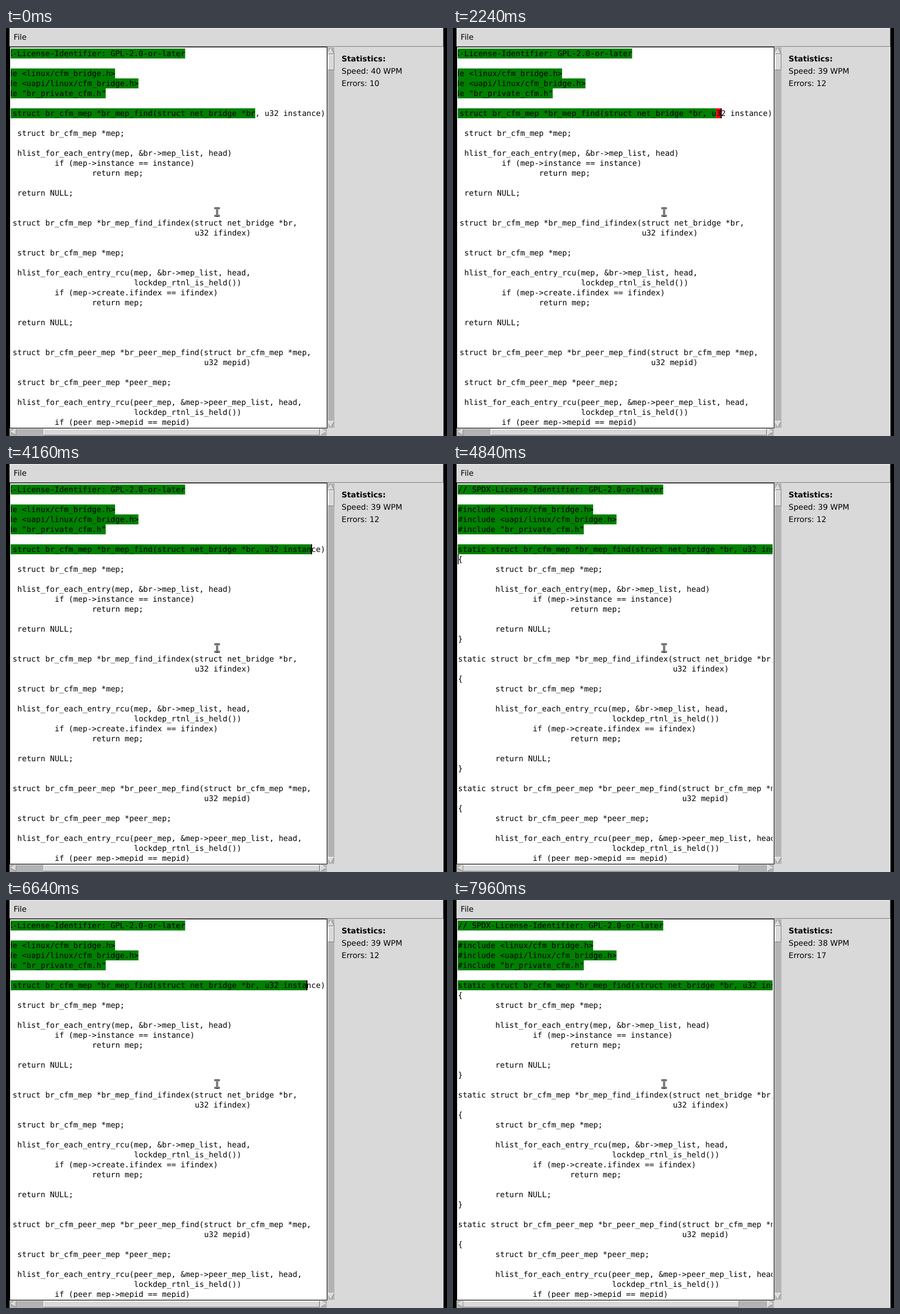
These frames come from a looping animation (752x696 px, 8 s). An HTML page:

```html
<!DOCTYPE html>
<html lang="en">
<head>
<meta charset="utf-8">
<title>Typing practice</title>
<style>
  html, body { margin: 0; width: 100%; height: 100%; overflow: hidden; background: #000; }
  svg { display: block; width: 100%; height: 100%; }
  text { font: 13.2px "DejaVu Sans", sans-serif; white-space: pre; text-rendering: geometricPrecision; }
  #code text { font: 13.23px "DejaVu Sans Mono", monospace; }
</style>
</head>
<body>
<svg viewBox="0 0 752 696">
  <defs>
    <clipPath id="view"><rect x="8" y="34" width="537" height="645"/></clipPath>
  </defs>
  <rect width="752" height="696" fill="#000"/>
  <rect x="6" width="740" height="696" fill="#d9d9d9"/>
  <path d="M6 .5H745" stroke="#eee"/>
  <path d="M6 31.5H746M745.5 0V32" stroke="#828282"/>
  <text x="13" y="20">File</text>

  <rect x="6.5" y="32.5" width="541" height="650" fill="#fff" stroke="#000"/>
  <g clip-path="url(#view)">
    <g id="scroll">
      <g id="marks"></g>
      <g id="code"></g>
      <rect id="caret" width="2" height="17"/>
    </g>
  </g>

  <g id="bars"></g>
  <g fill="none">
    <path id="beam" d="M355.5 307.5h3l1.5 1 1.5-1h3M355.5 320.5h3l1.5-1 1.5 1h3M360 308v12" stroke="#000" stroke-width="3"/>
    <path d="M356 307.5h3l1 1 1-1h3M356 320.5h3l1-1 1 1h3M360 308v12" stroke="#fff"/>
  </g>

  <text x="572.3" y="57" style="font-weight:bold">Statistics:</text>
  <text id="speed" x="572.3" y="78"></text>
  <text id="errors" x="572.3" y="99"></text>
</svg>
<script>
const NS = 'http://www.w3.org/2000/svg';
const $ = id => document.getElementById(id);
const set = (el, attrs) => { for (const k in attrs) el.setAttribute(k, attrs[k]); return el; };
const add = (parent, tag, attrs) => parent.appendChild(set(document.createElementNS(NS, tag), attrs));

const LOOP = 8000, CHAR = 7.965, LINE = 17, LEFT = 8, TOP = 35, SHIFT = 53;
const ROW = 6, START = 59;
const GREEN = '#008000', RED = '#ff0000';

const source = `// SPDX-License-Identifier: GPL-2.0-or-later

#include <linux/cfm_bridge.h>
#include <uapi/linux/cfm_bridge.h>
#include "br_private_cfm.h"

static struct br_cfm_mep *br_mep_find(struct net_bridge *br, u32 instance)
{
>struct br_cfm_mep *mep;

>hlist_for_each_entry(mep, &br->mep_list, head)
>>if (mep->instance == instance)
>>>return mep;

>return NULL;
}

static struct br_cfm_mep *br_mep_find_ifindex(struct net_bridge *br,
>>>>>      u32 ifindex)
{
>struct br_cfm_mep *mep;

>hlist_for_each_entry_rcu(mep, &br->mep_list, head,
>>>> lockdep_rtnl_is_held())
>>if (mep->create.ifindex == ifindex)
>>>return mep;

>return NULL;
}

static struct br_cfm_peer_mep *br_peer_mep_find(struct br_cfm_mep *mep,
>>>>>>u32 mepid)
{
>struct br_cfm_peer_mep *peer_mep;

>hlist_for_each_entry_rcu(peer_mep, &mep->peer_mep_list, head,
>>>> lockdep_rtnl_is_held())
>>if (peer_mep->mepid == mepid)`;

// Leading ">" marks one tab of eight columns.
const lines = source.split('\n').map(s => s.replace(/^>+/, m => ' '.repeat(8 * m.length)));

lines.forEach((s, i) => {
  if (!s) return;
  const indent = s.search(/\S/);
  add($('code'), 'text', { x: LEFT + .5 + indent * CHAR, y: 48 + i * LINE }).textContent = s.slice(indent);
  if (i < ROW) mark(i, 0, s.length, GREEN);
});

function mark(row, from, to, fill) {
  return add($('marks'), 'rect', {
    x: LEFT + from * CHAR, y: TOP + row * LINE, width: (to - from) * CHAR, height: LINE, fill
  });
}
const good = mark(ROW, 0, START, GREEN);
const bad = mark(ROW, 0, 0, RED);

// Key presses: "+" right, "x" wrong, "<" backspace, "n" newline.
const keys = [
  [320, '+'], [640, '+'], [960, 'x'], [1280, '<'], [1560, '+'], [2000, 'x'],
  [2560, '<'], [2840, '+'], [3040, '+'], [3240, '+'],
  [3400, '+'], [3560, '+'], [3720, '+'], [3840, '+'], [4000, '+'], [4160, '+'],
  [4280, '+'], [4440, '+'], [4600, '+'], [4840, 'n'], [5200, '<'],
  [5960, '<'], [6160, '<'], [6360, '<'], [6560, '<'], [6720, '<'],
  [6880, 'x'], [7060, 'x'], [7240, 'x'], [7420, 'x'], [7600, 'x'], [7920, 'n']
];

function stateAt(t) {
  const s = { ok: START, wrong: 0, errors: 10, next: false };
  for (const [at, key] of keys) {
    if (at > t) break;
    if (key === '+') s.ok++;
    else if (key === 'x') { s.wrong++; s.errors++; }
    else if (key === 'n') s.next = true;
    else if (s.next) s.next = false;
    else if (s.wrong) s.wrong--;
    else s.ok--;
  }
  return s;
}

// Scrollbars
const bars = $('bars');
const LIGHT = '#fff', DARK = '#828282', FACE = '#d9d9d9', TROUGH = '#b3b3b3';
function raised(x, y, w, h) {
  const g = add(bars, 'g', { transform: `translate(${x} ${y})` });
  add(g, 'rect', { width: w, height: h, fill: FACE });
  add(g, 'path', { d: `M.5 ${h}V.5H${w}`, stroke: LIGHT, fill: 'none' });
  add(g, 'path', { d: `M0 ${h - .5}H${w - .5}V0`, stroke: DARK, fill: 'none' });
  return g;
}
function arrow(x, y, turn) {
  const g = add(bars, 'g', { transform: `translate(${x} ${y})` });
  const pts = [0, 120, 240].map(a => {
    const r = (turn + a - 90) * Math.PI / 180;
    return [6.2 * Math.cos(r), 6.2 * Math.sin(r)];
  });
  add(g, 'path', { d: `M${pts.join('L')}Z`, fill: FACE });
  pts.forEach((p, i) => {
    const q = pts[(i + 1) % 3];
    const lit = p[0] + q[0] + p[1] + q[1] < 0;
    add(g, 'path', { d: `M${p}L${q}`, stroke: lit ? LIGHT : DARK });
  });
}
add(bars, 'rect', { x: 549, y: 33, width: 11, height: 649, fill: TROUGH });
add(bars, 'rect', { x: 6, y: 684, width: 541, height: 12, fill: TROUGH });
raised(549, 45, 11, 27);
const thumb = raised(64, 684, 471, 11);
arrow(554.5, 41, 0);
arrow(554.5, 674, 180);
arrow(14, 689.5, 270);
arrow(539.5, 689.5, 90);

function draw(t) {
  const s = stateAt(t), end = s.ok + s.wrong;
  set(good, { width: s.ok * CHAR });
  set(bad, { x: LEFT + s.ok * CHAR, width: s.wrong * CHAR });
  set($('scroll'), { transform: `translate(${s.next ? 0 : -SHIFT} 0)` });
  set(thumb, { transform: `translate(${s.next ? 17 : 64} 684)` });
  set($('caret'), {
    x: LEFT - .5 + (s.next ? 0 : end * CHAR),
    y: TOP + (s.next ? ROW + 1 : ROW) * LINE,
    visibility: (t + 870) % 900 < 600 ? 'visible' : 'hidden'
  });
  $('speed').textContent = `Speed: ${t < 640 ? 40 : t < 7920 ? 39 : 38} WPM`;
  $('errors').textContent = `Errors: ${s.errors}`;
}

function tick() {
  draw(performance.now() % LOOP);
  requestAnimationFrame(tick);
}
tick();
</script>
</body>
</html>
```
